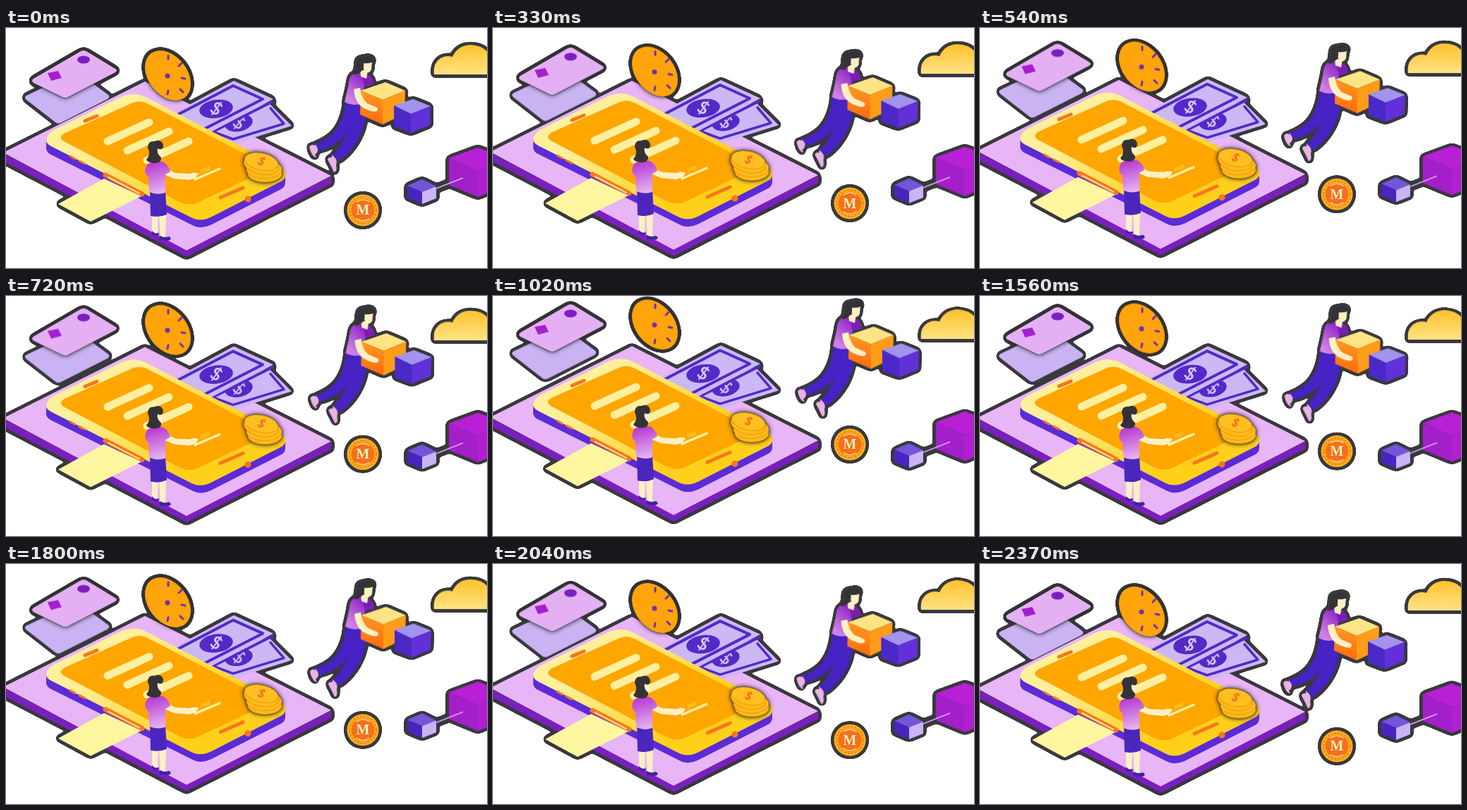
Recreate the animation shown at these times as an HTML page. Size 682 by 341 pixels, loop 2400 ms.

```html
<!DOCTYPE html>
<html lang="en">
<head>
<meta charset="utf-8">
<title>Floating payments</title>
<style>
  html, body { margin: 0; width: 100%; height: 100%; overflow: hidden; background: #fff; }
  svg { display: block; width: 100vw; height: 100vh; }
  .float { animation: float 1200ms cubic-bezier(.37, 0, .63, 1) -25ms infinite alternate; }
  @keyframes float { to { transform: translate(var(--x, 0px), var(--y)); } }
  .halo { filter: drop-shadow(0 0 3px #222); }
  .dark { filter: drop-shadow(0 0 1px #333) drop-shadow(0 0 3px #222); }
  .line { fill: none; stroke-linecap: round; stroke-linejoin: round; }
  .skin { fill: #fff0c4; }
  .hair { fill: #343236; }
  .pants { fill: #4722c4; }
  text { text-anchor: middle; }
  .sign { font: bold 25px Lato, Arial, sans-serif; }
</style>
</head>
<body>
<svg viewBox="0 0 682 341">
  <defs>
    <!-- One dark contour around the union of all parts -->
    <filter id="contour" filterUnits="userSpaceOnUse" x="-20" y="-20" width="722" height="381" color-interpolation-filters="sRGB">
      <feComponentTransfer in="SourceAlpha">
        <feFuncA type="linear" slope="10" intercept="-9"/>
      </feComponentTransfer>
      <feMorphology operator="dilate" radius="1"/>
      <feGaussianBlur stdDeviation="2.5"/>
      <feComponentTransfer result="grown">
        <feFuncA type="linear" slope="40" intercept="-1.6"/>
      </feComponentTransfer>
      <feFlood flood-color="#39383d"/>
      <feComposite in2="grown" operator="in" result="edge"/>
      <feComposite in="SourceGraphic" in2="grown" operator="in" result="art"/>
      <feMerge><feMergeNode in="edge"/><feMergeNode in="art"/></feMerge>
    </filter>
    <linearGradient id="body" x1="0" y1="0" x2="1" y2=".6">
      <stop offset=".3" stop-color="#fff09b"/><stop offset=".8" stop-color="#ffd01a"/>
    </linearGradient>
    <linearGradient id="sky" x1="0" y1="0" x2="0" y2="1">
      <stop offset="0" stop-color="#ffc22c"/><stop offset="1" stop-color="#ffe384"/>
    </linearGradient>
    <linearGradient id="box" x1="0" y1="0" x2="0" y2="1">
      <stop offset="0" stop-color="#ff9a20"/><stop offset="1" stop-color="#ff6a10"/>
    </linearGradient>
    <linearGradient id="shirt" x1=".3" y1="0" x2=".5" y2="1">
      <stop offset="0" stop-color="#b535cf"/><stop offset="1" stop-color="#e6b5f3"/>
    </linearGradient>
    <linearGradient id="top" x1="1" y1="0" x2=".2" y2="1">
      <stop offset=".2" stop-color="#8a1fc2"/><stop offset=".9" stop-color="#cf80e6"/>
    </linearGradient>
  </defs>

  <g filter="url(#contour)">
    <!-- Cards -->
    <g class="float" style="--y:-18px">
      <path d="M29 96L96 64Q100 62 104 65L145 95Q148 98 144 101L79 134Q74 137 70 134L29 102Q25 98 29 96Z" fill="#c9b3f3"/>
    </g>
    <g class="float" style="--y:-21px">
      <g class="dark">
        <path d="M39 72L106 33Q110 31 114 33L155 58Q159 60 155 63L88 98Q84 100 80 98L39 78Q35 75 39 72Z" fill="#e4b0f3"/>
      </g>
      <path d="M59 64L74 61 79 71 64 75Z" fill="#a51fd0"/>
      <ellipse cx="110" cy="45" rx="9" ry="5.500" fill="#7b1fbf"/>
    </g>

    <!-- Platform, bills and phone -->
    <g class="float" style="--y:-5px">
      <path d="M-4 178L256 314 461 211V221L256 325-4 189Z" fill="#7a1fbe"/>
      <path d="M-4 177L197 76 461 210 256 316Z" fill="#e8b5f6"/>

      <path d="M372 106L405 139 322 165 270 145Z" fill="#cbb9f5"/>
      <path class="line" d="M375 114L394 136 322 158 295 148" stroke="#5429c8" stroke-width="3.500"/>
      <ellipse cx="330" cy="135" rx="20" ry="12" transform="rotate(-12 330 135)" fill="#5429c8"/>
      <text class="sign" x="330" y="143" transform="rotate(35 330 135)" fill="#cbb9f5">$</text>
      <path d="M286 151L379 104" stroke="#5429c8" stroke-width="4"/>
      <path d="M323 75L379 101 288 149 232 124Z" fill="#cbb9f5"/>
      <path class="line" d="M240 125L322 82 364 101 282 143" stroke="#5429c8" stroke-width="4"/>
      <ellipse cx="298" cy="115" rx="24" ry="13" transform="rotate(-8 298 115)" fill="#5429c8"/>
      <text class="sign" x="298" y="123" transform="rotate(32 298 115)" fill="#d6c8f8">$</text>

      <path d="M57 160V172Q58 177 64 180L262 279Q275 287 290 280L390 229Q396 226 396 219V206Z" fill="#5b2bd6"/>
      <path d="M57 160Q58 150 68 145L165 97Q183 90 200 99L388 197Q398 203 396 211Q395 215 390 218L290 269Q275 276 262 269L64 168Q57 164 57 160Z" fill="url(#body)"/>
      <path d="M82 161Q73 155 84 149L180 106Q190 102 200 107L368 194Q377 199 367 203L270 249Q258 253 246 247Z" fill="#ffa600"/>
      <g class="line" stroke="#fff0a0" stroke-width="11">
        <path d="M144 161L203 134M172 174L231 147M200 188L259 161"/>
      </g>
      <g class="line" stroke="#f9761c" stroke-width="5">
        <path d="M112 132L129 125M304 241L336 227"/>
        <path d="M91 182L98 186M104 189L112 193" stroke-width="3"/>
        <path d="M141 209L193 236" stroke-width="7"/>
        <path d="M145 212L189 235" stroke="#ffe58a" stroke-width="2"/>
      </g>
      <circle cx="343" cy="243" r="4.500" fill="#f9761c"/>
      <path d="M74 250L139 214 192 239 120 275Z" fill="#fff6a0"/>
      <text x="283" y="204" transform="rotate(-24 283 202)" font-family="Lato, Arial, sans-serif" font-size="8" font-weight="bold" fill="#ffd63c">PAY</text>
      <path class="line" d="M268 215L303 200" stroke="#fff0a0" stroke-width="3.500"/>

      <!-- Standing woman -->
      <path class="skin" d="M207 264H216L215 290 210 293 207 288ZM217 264H227L226 297 219 299Z"/>
      <path d="M207 288Q212 294 217 291V294Q211 296 207 293ZM218 295Q225 299 231 296Q237 300 230 302L218 301Z" fill="#3c249c"/>
      <path d="M204 231H226L228 265Q217 270 205 267Z" fill="#4b26bd"/>
      <path class="skin" d="M224 198L240 206 260 207Q268 204 273 207L269 213 260 216 238 214 222 207ZM210 176H219V194H210Z"/>
      <path d="M201 193Q213 188 222 190Q230 193 233 204L226 208V234Q215 238 203 233L202 212Q193 205 201 193Z" fill="url(#shirt)"/>
      <path class="skin" d="M211 168H222V180Q220 185 214 184Z"/>
      <path class="hair" d="M201 170Q201 160 211 161Q216 158 221 162Q225 168 221 172Q217 173 215 171Q213 178 220 184Q221 191 212 192Q201 192 199 187Q206 180 201 170Z"/>
    </g>

    <!-- Clock -->
    <g class="float" style="--y:-28px">
      <g class="dark"><ellipse cx="229.500" cy="67.500" rx="39.500" ry="27.500" transform="rotate(52 229.500 67.500)" fill="#ffa40a"/></g>
      <circle cx="229" cy="68" r="3.500" fill="#7030b8"/>
      <path class="line" d="M230 39V44M249 50L245 54M254 72L249 71M251 91L247 87M230 89L229 94" stroke="#7030b8" stroke-width="3"/>
    </g>

    <!-- Coin stack -->
    <g class="float" style="--y:-12px">
      <g class="dark">
        <g fill="#ffb91a" stroke="#e99a08">
          <ellipse cx="367" cy="207" rx="24" ry="12"/>
          <ellipse cx="366" cy="201" rx="25" ry="13"/>
          <ellipse cx="362" cy="194" rx="25" ry="14" transform="rotate(12 362 194)"/>
          <ellipse cx="362" cy="190" rx="24" ry="12" transform="rotate(12 362 190)" fill="#ffbf20"/>
        </g>
      </g>
      <text x="362" y="195" transform="rotate(32 362 190)" font-family="Lato, Arial, sans-serif" font-size="16" font-weight="bold" fill="#f5681c">$</text>
    </g>

    <!-- Flying woman with boxes -->
    <g class="float" style="--x:2px;--y:-35px">
      <path d="M438 164Q446 174 438 180L440 184Q433 183 430 169Q433 164 438 167ZM462 180Q471 186 468 195Q470 204 465 205Q461 196 456 187Q457 183 462 184Z" fill="#e9b3e6"/>
      <path class="pants" d="M481 103L490 138Q480 157 469 163Q457 171 444 174L438 165Q454 159 464 149Q479 132 481 103Z"/>
      <path class="pants" d="M481 103L508 104Q512 125 506 143Q496 172 472 189L463 181Q478 164 485 144Z"/>
      <path d="M491 66Q504 61 513 66Q520 70 521 80L508 83 506 107Q492 112 480 105Q484 90 486 78Q487 69 491 66Z" fill="url(#top)"/>
      <path d="M505 67Q518 67 520 80L508 83Z" fill="#7a1db6"/>
      <path class="skin" d="M502 60H513L511 72 503 69ZM503 47H519L518 59Q516 64 509 64Z"/>
      <path class="hair" d="M497 50Q498 41 507 42Q520 38 521 48Q514 51 507 50Q508 60 503 62Q498 67 493 66Q498 60 497 50Z"/>
      <path d="M503 89L538 77 566 89 534 102Z" fill="#ffe485"/>
      <path d="M503 89L534 102V137L502 123Z" fill="url(#box)"/>
      <path d="M534 102L566 89 565 122 534 137Z" fill="#ff9d18"/>
      <path d="M550 110L577 101 602 111 574 122Z" fill="#a193ee"/>
      <path d="M550 110L574 122V149L550 140Z" fill="#4a29c6"/>
      <path d="M574 122L602 111 601 138 574 149Z" fill="#6130d8"/>
      <path class="skin" d="M493 87L502 85Q504 100 512 107L526 113Q529 118 523 119Q508 117 500 108Q494 100 493 87Z"/>
    </g>

    <!-- Letter coin -->
    <g class="float" style="--y:-50px">
      <circle cx="506" cy="259" r="22.500" fill="#ffb31a"/>
      <circle cx="506" cy="259" r="19" fill="none" stroke="#f47a1e" stroke-width="2" stroke-dasharray="3 2"/>
      <circle cx="506" cy="259" r="16.500" fill="#f4701c"/>
      <path class="line" d="M497 247Q506 241 515 247M497 271Q506 277 515 271" stroke="#ffd98a" stroke-width="1.500"/>
      <text x="506" y="265.500" font-family="Liberation Serif, Times, serif" font-size="20" font-weight="bold" fill="#fff0c0">M</text>
    </g>

    <!-- Linked cubes -->
    <g class="float" style="--y:-6px">
      <path d="M628 185L669 170 710 185 669 203Z" fill="#b820d6"/>
      <path d="M628 185L669 203V240L628 223Z" fill="#a31fca"/>
      <path d="M669 203L710 185V223L669 240Z" fill="#b21fd3"/>
      <path d="M569 224L590 215 610 225 590 233Z" fill="#7255da"/>
      <path d="M569 224L590 233V250L569 241Z" fill="#4825bf"/>
      <path d="M590 233L610 225V242L590 250Z" fill="#c9b5f6"/>
      <path d="M610 228L628 221" stroke="#39383d" stroke-width="5"/>
      <path d="M610 228L648 213" stroke="#d9b0ee" stroke-width="1.500"/>
    </g>

    <!-- Cloud -->
    <g class="float" style="--y:-5px">
      <path d="M607 66Q605 50 616 43Q624 38 633 41Q640 25 658 24Q674 24 684 35L700 45V66Z" fill="url(#sky)"/>
    </g>
  </g>
</svg>
</body>
</html>
```
